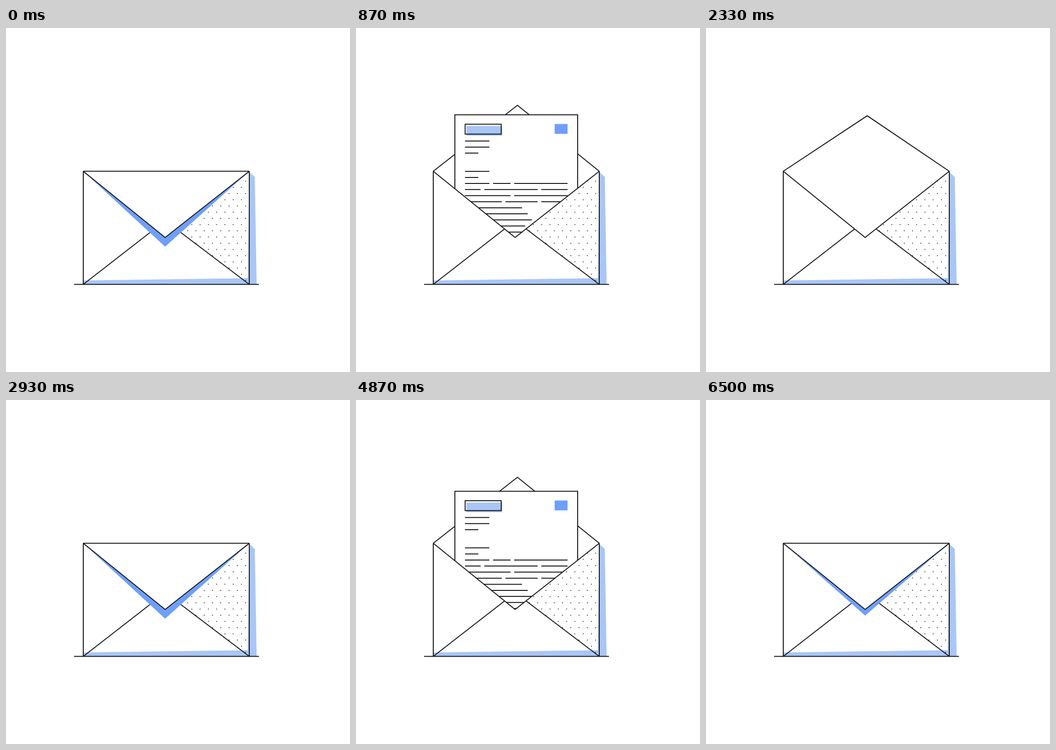
An HTML page with a canvas for the animation above (6.53 s loop, 748 by 748 pixels).

```html
<!DOCTYPE html>
<html lang="en">
<head>
<meta charset="utf-8">
<title>Envelope</title>
<style>
html, body { margin: 0; height: 100%; overflow: hidden; background: #fff; }
canvas { display: block; width: 100vw; height: 100vh; }
</style>
</head>
<body>
<canvas id="stage" width="748" height="748"></canvas>
<script>
const ctx = document.getElementById('stage').getContext('2d');
const INK = '#131313', PALE = '#a9c6f5', BLUE = '#6f9ffb', WHITE = '#fff';
const LOOP = 6530, SECOND = 3840;
const LEFT = 168, RIGHT = 529, TOP = 311.5, BASE = 557.5;
const NOTCH = [346, 455.5], PEAK = [351, 168];
const A = [LEFT, TOP], B = [RIGHT, TOP], C = [RIGHT, BASE], D = [LEFT, BASE];

function path(points, closed) {
  ctx.beginPath();
  points.forEach(p => ctx.lineTo(...p));
  if (closed) ctx.closePath();
}
function fill(color, ...points) {
  path(points, true);
  ctx.fillStyle = color;
  ctx.fill();
}
function line(...points) {
  path(points);
  ctx.stroke();
}
function box(color, x, y, w, h) {
  ctx.fillStyle = color;
  ctx.fillRect(x, y, w, h);
}
const mix = (a, b, k) => a + (b - a) * k;
const ramp = (t, from, to) => Math.min(1, Math.max(0, (t - from) / (to - from)));
const ease = (t, from, to) => (1 - Math.cos(Math.PI * ramp(t, from, to))) / 2;

// The letter rises past its rest height, settles, then drops back
function letterTop(t) {
  const inside = 460, over = 180, rest = 198.5;
  if (t < 740) return mix(inside, over, ease(t, 300, 740));
  if (t < 1960) return mix(over, rest, ease(t, 740, 1010));
  return mix(rest, inside, ease(t, 1960, 2330));
}

function drawFlap(swing) {
  const tip = NOTCH.map((v, i) => mix(v, PEAK[i], swing));
  fill(WHITE, A, tip, B);
  line(A, tip, B);
  if (swing < .5) line(A, B);
}

function drawText() {
  const start = 237, end = 460, gap = 8, pitch = 13.2;
  const dash = (row, from, to) => line([from, 57 + row * pitch], [to, 57 + row * pitch]);
  // Two short blocks, each closed by a shorter line
  for (const row of [0, 1, 2, 5, 6]) dash(row, start, row % 4 === 2 ? 266 : 290);
  // Four full lines with word gaps, then single dashes of uneven length
  for (let i = 0; i < 9; i++) {
    const row = 7 + i;
    if (i > 3) {
      dash(row, start, 372 - 11 * Math.cos(1.7 * (i - 4)));
      continue;
    }
    const first = 271 + (19 + 65 * i) % 84;
    const second = i % 2 ? 395 : 336;
    dash(row, start, first);
    if (second > first) dash(row, first + gap, second);
    dash(row, second + gap, end);
  }
}

function drawLetter(y) {
  ctx.save();
  ctx.beginPath();
  ctx.rect(0, 0, 748, BASE);
  ctx.clip();
  ctx.translate(0, y);
  box(WHITE, 215, 0, 267, 400);
  ctx.strokeRect(215, 0, 267, 400);
  box(PALE, 240, 24.5, 78, 21);
  ctx.strokeRect(237.3, 20.5, 78.4, 21.5);
  box(BLUE, 432, 20, 28, 21.5);
  drawText();
  ctx.restore();
}

function drawDots() {
  ctx.save();
  path([B, [370, 437], C], true);
  ctx.clip();
  ctx.fillStyle = INK;
  for (let row = 0; row < 17; row++)
    for (let x = 521 - row % 2 * 9; x > 365; x -= 18) {
      ctx.beginPath();
      ctx.arc(x, 333 + row * 13.5, 1, 0, 7);
      ctx.fill();
    }
  ctx.restore();
}

function drawFront() {
  fill(WHITE, A, NOTCH, B, C, D);
  fill(PALE, [RIGHT, 314], [525.5, 544], [LEFT, 549], D, C);
  drawDots();
  line(D, [323, 437]);
  line(C, [370, 437]);
  line(A, NOTCH, B);
  line(A, D);
  line(B, C);
}

function draw(now) {
  const time = now % LOOP;
  const t = time < SECOND ? time : time - SECOND;
  const opening = t < 1500;
  const swing = opening ? ease(t, 80, 400) : 1 - ease(t, 2270, 2600);
  const shade = opening ? 1 - ramp(t, 0, 90) : ramp(t, 2600, 2690);

  box(WHITE, 0, 0, 748, 748);
  ctx.strokeStyle = INK;
  ctx.lineWidth = 2;

  fill(PALE, [RIGHT, 313], [541, 324], [545, BASE], C);
  if (swing >= .5) drawFlap(swing);
  drawLetter(letterTop(t));
  drawFront();
  if (shade) fill(BLUE, A, [NOTCH[0], NOTCH[1] + 20 * shade], B);
  if (swing < .5) drawFlap(swing);
  line([148, BASE], [550, BASE]);
}

let start;
function loop(now) {
  start ??= now;
  draw(now - start);
  requestAnimationFrame(loop);
}
requestAnimationFrame(loop);
</script>
</body>
</html>
```
